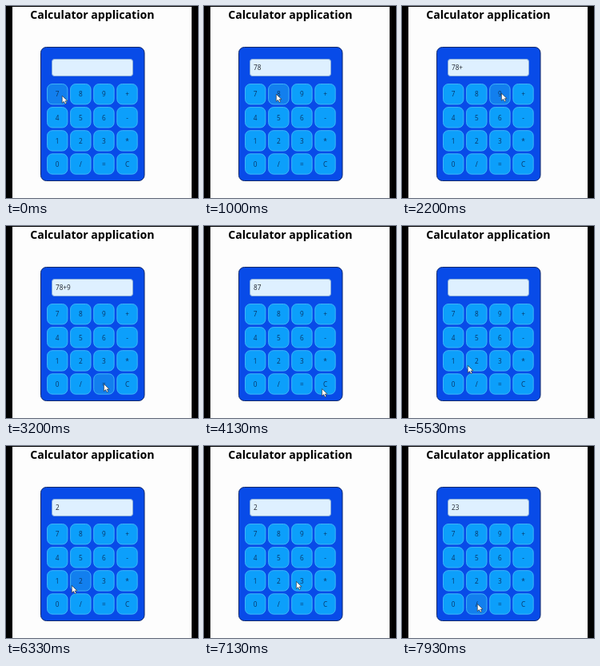
These frames come from a looping animation (240 px wide and 240 px high, 8000 ms). An HTML page:

```html
<!DOCTYPE html>
<html lang="en">
<head>
<meta charset="utf-8">
<title>Calculator application</title>
<style>
  html, body { margin: 0; width: 100%; height: 100%; overflow: hidden; background: #000; }
  svg { display: block; width: 100vw; height: 100vh; }
  text { font: 8.2px "Open Sans", "Noto Sans", sans-serif; }
  .title { font-size: 14.1px; font-weight: 700; fill: #000; }
  .key text { fill: #0b3564; text-anchor: middle; }
  .key rect { stroke: #46baf8; stroke-width: .9; }
  .value { fill: #20262e; }
</style>
</head>
<body>
<svg viewBox="0 0 240 240">
  <rect width="240" height="240"/>
  <rect x="8" y="1" width="224" height="239" fill="#fdfdfd"/>
  <text class="title" x="30.3" y="16">Calculator application</text>
  <rect x="43.5" y="51.5" width="129.5" height="167" rx="7" fill="#084be8" stroke="#10296a"/>
  <rect x="57.5" y="66.5" width="101" height="21" rx="3" fill="#def0ff" stroke="#86a9d8"/>
  <text class="value" id="value" x="62" y="80"></text>
  <g id="keys"></g>
  <path id="cursor" d="M0 0V9L2.2 7.1 3.7 10.2 5.3 9.4 3.8 6.5H6.7Z" fill="#fff" stroke="#222" stroke-width=".6"/>
</svg>
<script>
const LOOP = 8000, STEP = 1000 / 15;
const TRAVEL = 330, PRESS = 270, FADE = 100;
const LEFT = 51.5, TOP = 97.5, PITCH = 29.1, SIZE = 25.4;
const LABELS = "789+456-123*0/=C";
const BASE = [12, 159, 251], HOVER = [18, 127, 238];

// Each press: when the pointer arrives and how far off the key's centre it lands.
const presses = [
  { label: "7", at: -100, dx: 6, dy: 2 },
  { label: "8", at: 600, dx: -3, dy: 0 },
  { label: "+", at: 1460, dx: -2, dy: 1 },
  { label: "9", at: 2070, dx: 2, dy: -1 },
  { label: "=", at: 3060, dx: 0, dy: 0 },
  { label: "C", at: 4130, dx: -4, dy: 6 },
  { label: "2", at: 5530, dx: -11, dy: 6 },
  { label: "3", at: 7130, dx: -7, dy: 1 },
  { label: "/", at: 7730, dx: 1, dy: 0 }
];

const NS = "http://www.w3.org/2000/svg";
function add(parent, tag, attrs = {}) {
  const node = parent.appendChild(document.createElementNS(NS, tag));
  for (const name in attrs) node.setAttribute(name, attrs[name]);
  return node;
}

const clamp = u => Math.min(1, Math.max(0, u));
const ease = u => u * u * (3 - 2 * u);
const mix = (a, b, u) => a + (b - a) * u;

const keysGroup = document.getElementById("keys");
const cursor = document.getElementById("cursor");
const value = document.getElementById("value");

const keys = [...LABELS].map((label, i) => {
  const x = LEFT + (i % 4) * PITCH, y = TOP + Math.floor(i / 4) * PITCH;
  const group = add(keysGroup, "g", { class: "key" });
  const rect = add(group, "rect", { x, y, width: SIZE, height: SIZE, rx: 6.5 });
  add(group, "text", { x: x + SIZE / 2, y: y + 15.9 }).textContent = label;
  return { label, rect, cx: x + SIZE / 2, cy: y + SIZE / 2 };
});

presses.forEach((press, i) => {
  const key = keys.find(k => k.label === press.label);
  press.x = key.cx + press.dx;
  press.y = key.cy + press.dy;
  press.leave = i + 1 < presses.length ? presses[i + 1].at - TRAVEL : LOOP;
});

function type(text, label) {
  if (label === "C") return "";
  if (label === "=") return String(text.split("+").reduce((sum, n) => sum + Number(n), 0));
  return text + label;
}

function pointerAt(time) {
  let { x, y } = presses[0];
  for (const press of presses) {
    const u = ease(clamp((time - press.at + TRAVEL) / TRAVEL));
    x = mix(x, press.x, u);
    y = mix(y, press.y, u);
  }
  return [x, y];
}

function hoverLevel(label, time) {
  const press = presses.find(p => p.label === label);
  if (!press) return 0;
  return clamp((time - press.at) / FADE) - clamp((time - press.leave) / FADE);
}

function draw(now) {
  const time = Math.floor((now % LOOP) / STEP + 0.06) * STEP;
  cursor.setAttribute("transform", `translate(${pointerAt(time)})`);
  value.textContent = presses
    .filter(p => p.at + PRESS <= time)
    .reduce((text, p) => type(text, p.label), "");
  for (const { label, rect } of keys) {
    const level = hoverLevel(label, time);
    rect.setAttribute("fill", `rgb(${BASE.map((c, i) => Math.round(mix(c, HOVER[i], level)))})`);
  }
}

function tick(now) {
  draw(now);
  requestAnimationFrame(tick);
}
draw(0);
requestAnimationFrame(tick);
</script>
</body>
</html>
```
